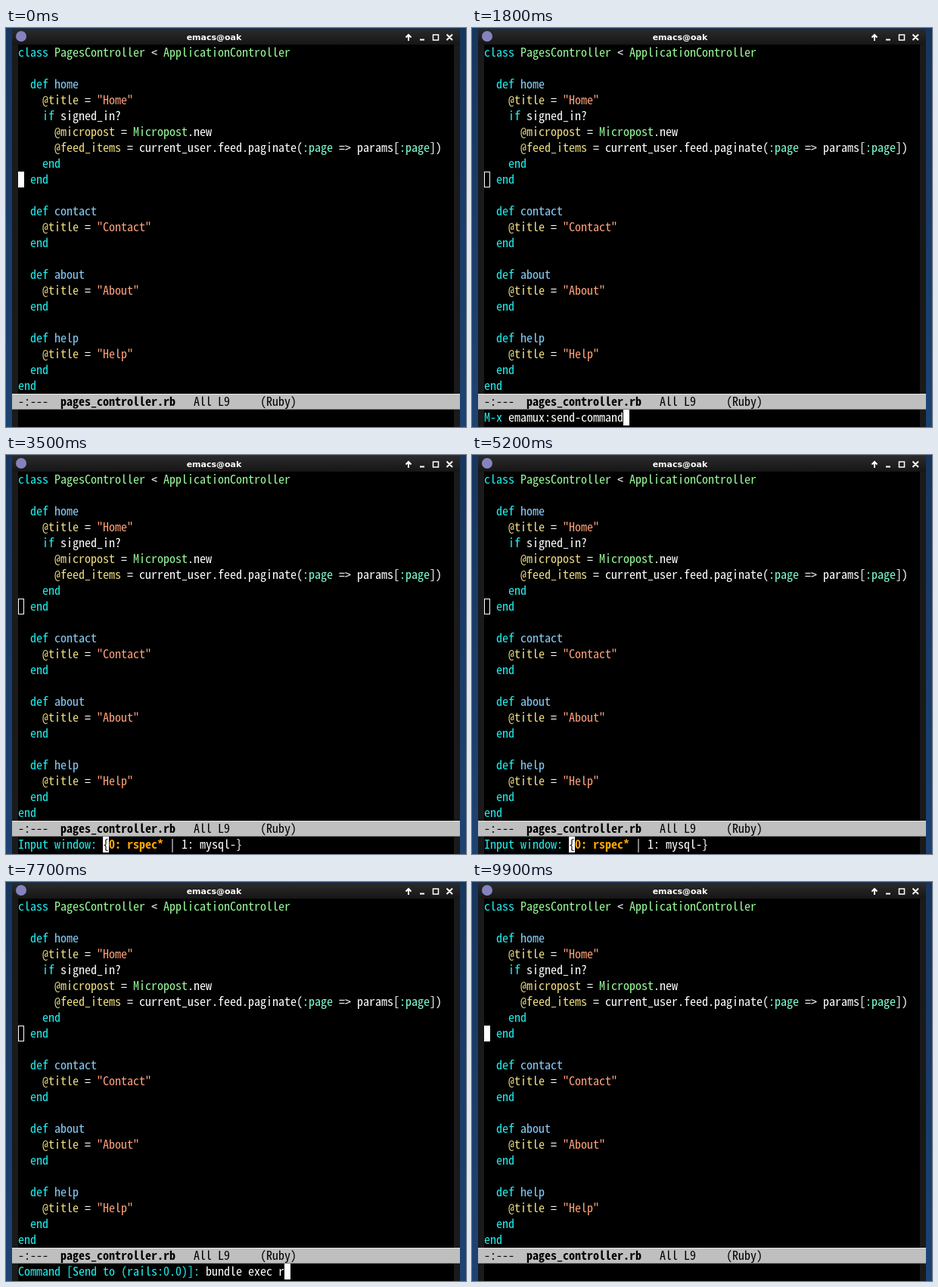
An HTML page for the animation above (10000 ms loop, 608 by 528 pixels).

```html
<!DOCTYPE html>
<html lang="en">
<head>
<meta charset="utf-8">
<title>Editor session</title>
<style>
html, body { margin: 0; width: 608px; height: 528px; overflow: hidden; background: #000; }
svg { display: block; }
text { white-space: pre; }
.code { font-family: "Noto Sans Mono CJK JP", "Noto Sans Mono", "DejaVu Sans Mono", monospace; }
.bold { font-weight: bold; }
.title { font: bold 11px "DejaVu Sans", sans-serif; fill: #fff; }
</style>
</head>
<body>
<svg id="stage" width="608" height="528" viewBox="0 0 608 528">
  <defs>
    <linearGradient id="desk" x2="0" y2="1">
      <stop offset="0" stop-color="#17365e"/>
      <stop offset="1" stop-color="#1d4373"/>
    </linearGradient>
    <linearGradient id="bar" x2="0" y2="1">
      <stop offset="0" stop-color="#2b2b2b"/>
      <stop offset="1" stop-color="#161616"/>
    </linearGradient>
  </defs>
  <rect width="608" height="528" fill="url(#desk)"/>
  <path d="M8 528V5Q8 1 12 1H596Q600 1 600 5V528Z" fill="#1a1a1a"/>
  <path d="M8 22V5Q8 1 12 1H596Q600 1 600 5V22Z" fill="url(#bar)"/>
  <rect x="16" y="22" width="576" height="506"/>
  <circle cx="20" cy="11" r="7" fill="#8583bd"/>
  <text class="title" x="275" y="16" text-anchor="middle">emacs@oak</text>
  <g fill="none" stroke="#fff" stroke-width="2">
    <path d="M532 17V9M528.5 12.5L532 9L535.5 12.5M547 15.5H553M582.5 8.5L590 16M590 8.5L582.5 16"/>
    <path d="M564.5 9H571.5V16H564.5Z" stroke-width="1.5"/>
  </g>
  <rect x="8" y="484" width="592" height="21" fill="#bfbfbf"/>
  <path d="M8 484.5H600" stroke="#e5e5e5"/>
  <path d="M8 504.5H600" stroke="#808080"/>
  <rect id="point" stroke="#fff"/>
  <g id="buffer" class="code"></g>
  <g id="echo" class="code"></g>
</svg>
<script>
const CELL = 8, ROW = 21, LEFT = 16, TOP = 22, LOOP = 10000;
const COLOR = {
  variable: '#eedd82', string: '#ffa07a', symbol: '#7fffd4', keyword: '#20eeee',
  method: '#87cefa', type: '#98fb98', plain: '#ffffff', prompt: '#20eeee'
};
const SOURCE = `class PagesController < ApplicationController

  def home
    @title = "Home"
    if signed_in?
      @micropost = Micropost.new
      @feed_items = current_user.feed.paginate(:page => params[:page])
    end
  end

  def contact
    @title = "Contact"
  end

  def about
    @title = "About"
  end

  def help
    @title = "Help"
  end
end`;
const TOKEN = /(?<variable>@\w+)|(?<string>"[^"]*")|(?<symbol>:\w+)|(?<method>(?<=def )\w+)|(?<keyword>\b(?:class|def|if|end)\b)|(?<type>\b[A-Z]\w*)|(?<plain>[a-z_]\w*|[^\s\w@":]+)/g;

const $ = id => document.getElementById(id);
const buffer = $('buffer'), echo = $('echo'), point = $('point');

function add(parent, tag, attrs, content = '') {
  const node = document.createElementNS('http://www.w3.org/2000/svg', tag);
  for (const key in attrs) node.setAttribute(key, attrs[key]);
  node.textContent = content;
  return parent.appendChild(node);
}

function write(parent, col, row, content, fill, bold) {
  add(parent, 'text', {
    x: LEFT + col * CELL, y: TOP + row * ROW + 16, fill, class: bold ? 'bold' : ''
  }, content);
}

// Pick the type size whose advance equals one cell.
function fitFont() {
  const ctx = document.createElement('canvas').getContext('2d');
  ctx.font = '100px ' + getComputedStyle(buffer).fontFamily;
  const size = CELL * 100 / ctx.measureText('M').width;
  for (const group of [buffer, echo]) group.style.fontSize = size + 'px';
}

function drawBuffer() {
  SOURCE.split('\n').forEach((line, row) => {
    for (const match of line.matchAll(TOKEN)) {
      const kind = Object.keys(match.groups).find(key => match.groups[key]);
      write(buffer, match.index, row, match[0], COLOR[kind]);
    }
  });
  write(buffer, 0, 22, '-:---', '#000');
  write(buffer, 7, 22, 'pages_controller.rb', '#000', true);
  write(buffer, 29, 22, 'All L9', '#000');
  write(buffer, 40, 22, '(Ruby)', '#000');
}

function typed(content, t, start, step) {
  return content.slice(0, Math.max(0, Math.floor((t - start) / step) + 1));
}

// Minibuffer contents as [text, colour, bold] runs, and the cursor column.
function minibuffer(t) {
  const entry = (prompt, input) => ({
    runs: [[prompt, COLOR.prompt], [input, '#fff']], cursor: prompt.length + input.length
  });
  if (t < 300 || t >= 9500) return null;
  if (t < 2600) return entry('M-x ', typed('emamux:send-command', t, 400, 72));
  if (t < 5700) return {
    runs: [['Input window: ', COLOR.prompt], ['{', '#000'],
           ['0: rspec*', '#ffa500', true], [' | 1: mysql-}', '#fff']],
    cursor: 14
  };
  return entry('Command [Send to (rails:0.0)]: ', typed('bundle exec rspec spec', t, 6060, 136));
}

let shown;
function render(t) {
  const state = minibuffer(t), key = JSON.stringify(state);
  if (key === shown) return;
  shown = key;
  const inset = state ? 0.5 : 0;
  const box = {
    x: LEFT + inset, y: TOP + 8 * ROW + inset, width: CELL - 2 * inset, height: ROW - 2 * inset,
    fill: state ? 'none' : '#fff', 'stroke-width': state ? 1 : 0
  };
  for (const name in box) point.setAttribute(name, box[name]);
  echo.replaceChildren();
  if (!state) return;
  add(echo, 'rect', {
    x: LEFT + state.cursor * CELL, y: TOP + 23 * ROW, width: CELL, height: ROW, fill: '#fff'
  });
  let col = 0;
  for (const [content, fill, bold] of state.runs) {
    write(echo, col, 23, content, fill, bold);
    col += content.length;
  }
}

fitFont();
drawBuffer();
const begin = performance.now();
function tick() {
  render((performance.now() - begin) % LOOP);
  requestAnimationFrame(tick);
}
tick();
</script>
</body>
</html>
```
